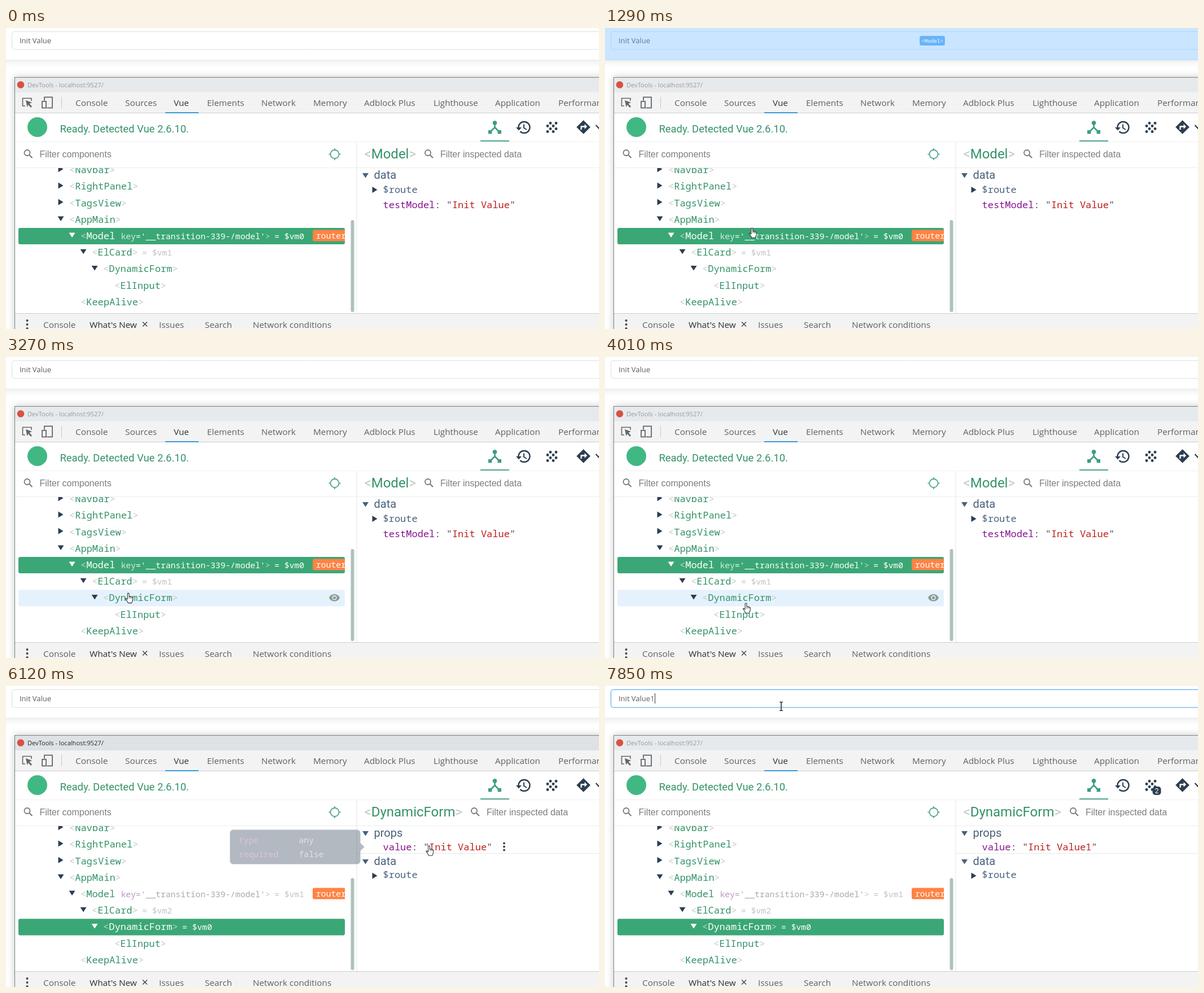
An HTML page with a canvas for the animation above (8 s loop, 1050 px wide and 533 px high).

```html
<!DOCTYPE html>
<html lang="en">
<head>
<meta charset="utf-8">
<title>Component inspector</title>
<style>
html, body { margin: 0; width: 100%; height: 100%; overflow: hidden; background: #fff; }
canvas { display: block; }
</style>
</head>
<body>
<canvas id="stage" width="1050" height="533"></canvas>
<script>
const ctx = document.getElementById('stage').getContext('2d');
const LOOP = 8000, SELECT = 4480, FOCUS = 7450, TYPED = 7850;
const GREEN = '#349268', ROW_GREEN = '#3ba776', DARK = '#2c3e50', SLATE = '#48617c', TEAL = '#54a592';
const UI = '"Open Sans", sans-serif';
const TAB_FONT = '15.3px ' + UI;
const SEARCH_FONT = '16px "Liberation Sans", sans-serif';
const mono = size => `${size}px "Noto Sans Mono", monospace`;
const roboto = size => `${size}px Roboto, sans-serif`;
const CODE = mono(17), SMALL = mono(14.7);

const ROW_H = 29.2, TREE_TOP = 237;
const rows = [
  { name: 'Navbar', x: 112, arrow: 'right' },
  { name: 'RightPanel', x: 112, arrow: 'right' },
  { name: 'TagsView', x: 112, arrow: 'right' },
  { name: 'AppMain', x: 112, arrow: 'down' },
  { name: 'Model', x: 132, arrow: 'down', key: '__transition-339-/model', vm: ['$vm0', '$vm1'] },
  { name: 'ElCard', x: 152, arrow: 'down', vm: ['$vm1', '$vm2'] },
  { name: 'DynamicForm', x: 172, arrow: 'down', vm: ['', '$vm0'] },
  { name: 'ElInput', x: 192 },
  { name: 'KeepAlive', x: 132 }
];
const tabs = [['Console', 123], ['Sources', 211], ['Vue', 297], ['Elements', 356], ['Network', 452],
  ['Memory', 544], ['Adblock Plus', 634], ['Lighthouse', 757], ['Application', 866], ['Performance', 978]];
const drawer = [['Console', 66], ["What's New", 148], ['Issues', 271], ['Search', 352], ['Network conditions', 437]];

// time, x, y of the pointer tip
const pointerPath = [
  [400, 292, 508], [540, 281, 428], [800, 281, 428], [940, 281, 357], [1220, 277, 357],
  [1290, 260.5, 354], [1570, 200, 360], [1640, 200, 360], [2060, 195, 359], [3000, 195, 359],
  [3270, 216.5, 418], [3540, 243, 447], [3810, 243, 447], [4010, 249.5, 436], [4949, 249.5, 436],
  [4950, 501.5, 361], [5300, 690, 303], [5720, 755, 284], [5780, 755, 284], [5850, 749.5, 283],
  [6120, 749.5, 283], [6900, 310, 46], [6969, 310, 46], [6970, 312, 36]
];
const highlights = [[470, 800, 'DynamicForm'], [900, 3130, 'Model'], [3470, 3810, 'ElInput'], [4080, 4950, 'DynamicForm']];

const clamp = v => Math.max(0, Math.min(1, v));
const mix = (a, b, k) => a + (b - a) * k;

function pointerAt(t) {
  if (t < pointerPath[0][0]) return null;
  const i = pointerPath.findIndex(p => p[0] > t);
  const a = pointerPath[i < 0 ? pointerPath.length - 1 : i - 1];
  const b = i < 0 ? a : pointerPath[i];
  const k = a === b ? 0 : (t - a[0]) / (b[0] - a[0]);
  const onTarget = t < 5020 || (t >= 5350 && t < 6190);
  return { x: mix(a[1], b[1], k), y: mix(a[2], b[2], k), shape: t >= 6970 ? 'beam' : onTarget ? 'hand' : 'arrow' };
}

function text(str, x, y, color, font) {
  ctx.font = font;
  ctx.fillStyle = color;
  ctx.fillText(str, x, y);
  return x + ctx.measureText(str).width;
}
function rect(x, y, w, h, color) {
  ctx.fillStyle = color;
  ctx.fillRect(x, y, w, h);
}
function roundRect(x, y, w, h, r, fill, stroke) {
  ctx.beginPath();
  ctx.roundRect(x, y, w, h, r);
  if (fill) { ctx.fillStyle = fill; ctx.fill(); }
  if (stroke) { ctx.strokeStyle = stroke; ctx.lineWidth = 1; ctx.stroke(); }
}
function dot(x, y, r, color) {
  ctx.beginPath();
  ctx.arc(x, y, r, 0, Math.PI * 2);
  ctx.fillStyle = color;
  ctx.fill();
}
function ring(x, y, r, color, width) {
  ctx.beginPath();
  ctx.arc(x, y, r, 0, Math.PI * 2);
  ctx.strokeStyle = color;
  ctx.lineWidth = width;
  ctx.stroke();
}
function trace(points, x = 0, y = 0) {
  ctx.beginPath();
  points.forEach(([px, py]) => ctx.lineTo(x + px, y + py));
}
function poly(points, x, y, color) {
  trace(points, x, y);
  ctx.closePath();
  ctx.fillStyle = color;
  ctx.fill();
}
function line(points, color, width) {
  trace(points);
  ctx.strokeStyle = color;
  ctx.lineWidth = width;
  ctx.stroke();
}
function triangle(x, y, dir, color = DARK) {
  poly(dir === 'down' ? [[-5.5, -4], [5.5, -4], [0, 4.5]] : [[-4.5, -5.5], [4.5, 0], [-4.5, 5.5]], x, y, color);
}
function searchIcon(x) {
  ring(x - 2, 221, 5, '#777', 1.8);
  line([[x + 1.7, 224.7], [x + 7, 230]], '#777', 2);
}
function moreDots(x, y, gap) {
  for (const d of [-gap, 0, gap]) dot(x, y + d, 2, '#445');
}

function drawPage(t) {
  ctx.save();
  ctx.shadowColor = 'rgba(0,0,0,.1)';
  ctx.shadowBlur = 12;
  ctx.shadowOffsetY = 2;
  rect(-20, -20, 1100, 77, '#fff');
  ctx.restore();
  rect(0, 56, 1050, 1, '#ebeef5');
  const k = clamp((t - FOCUS) / 200);
  const base = t >= 6970 ? [192, 196, 204] : [220, 223, 230];
  const border = [64, 158, 255].map((c, i) => Math.round(mix(base[i], c, k)));
  roundRect(10.5, 6.5, 1140, 31.5, 4, '#fff', `rgb(${border})`);
  const end = text('Init Value' + (t >= TYPED ? '1' : ''), 24, 26.5, '#565a5e', '13px ' + UI);
  if (t >= FOCUS + 50) rect(Math.round(end), 13, 1, 18, '#333');
}

function drawHighlight(t) {
  const hit = highlights.find(([from, to]) => t >= from && t < to);
  if (!hit) return;
  const tint = 'rgba(104,182,255,.35)';
  if (hit[2] === 'Model') rect(0, 0, 1050, 57, tint);
  else roundRect(10, 6, 1140, 32, 3, tint);
  ctx.font = '9.2px "Liberation Mono", monospace';
  const font = ctx.font, w = ctx.measureText(`<${hit[2]}>`).width + 6;
  roundRect(579.5 - w / 2, 14, w, 17, 3, 'rgba(96,175,250,.92)');
  let x = text('<', 582.5 - w / 2, 26, '#cfe7ff', font);
  x = text(hit[2], x, 26, '#fff', font);
  text('>', x, 26, '#cfe7ff', font);
}

function drawToolbar(active) {
  ctx.save();
  ctx.shadowColor = 'rgba(0,0,0,.22)';
  ctx.shadowBlur = 12;
  rect(15, 87, 1100, 500, '#7d8084');
  ctx.restore();
  rect(16, 88, 1034, 445, '#fff');
  rect(16, 88, 1034, 27, active ? '#dee1e6' : '#e7eaed');
  dot(26, 100.5, 6.3, '#d9513f');
  text('DevTools - localhost:9527/', 38, 105, active ? '#25282c' : '#96999d', '11.1px ' + UI);

  rect(16, 114, 1034, 36, '#f3f3f3');
  rect(16, 150, 1034, 1, '#cdcdcd');
  const ink = '#62666b';
  line([[34, 138], [29.5, 138], [29.5, 124.5], [45, 124.5], [45, 129]], ink, 1.6);
  poly([[0, 0], [11, 4], [6.5, 6], [11, 11], [9, 13], [4.5, 8], [2.5, 12]], 35, 128, ink);
  ctx.strokeStyle = ink;
  ctx.lineWidth = 1.8;
  ctx.strokeRect(68, 122.5, 14, 19);
  rect(62.5, 128.5, 10, 14.5, '#f3f3f3');
  ctx.strokeRect(64, 130, 7, 11.5);
  rect(98, 122, 1, 20, '#c8c8c8');
  tabs.forEach(([label, x]) => text(label, x, 137.5, label === 'Vue' ? '#333' : '#5c6065', TAB_FONT));
  rect(282, 149, 59, 2, '#3a9ad9');
}

function drawHeader(t) {
  dot(55.5, 175.5, 17.5, '#41b883');
  text('Ready. Detected Vue 2.6.10.', 95.5, 184.5, GREEN, roboto(18.4));

  // component hub
  dot(865.5, 168, 3.8, '#3d9c84');
  line([[865.5, 168], [865.5, 176], [857, 184.5]], '#3d9c84', 2.6);
  line([[865.5, 176], [874, 184.5]], '#3d9c84', 2.6);
  rect(854, 181, 6.4, 6.4, '#3d9c84');
  rect(870.6, 181, 6.4, 6.4, '#3d9c84');
  rect(840, 199, 51, 2, TEAL);

  // history
  ctx.beginPath();
  ctx.arc(917.5, 176, 10, -Math.PI, Math.PI * 0.75);
  ctx.strokeStyle = DARK;
  ctx.lineWidth = 2.4;
  ctx.stroke();
  poly([[-5, 0], [5, 0], [0, 5.5]], 908, 176, DARK);
  line([[917, 170.5], [917, 177], [922, 180]], DARK, 2);

  // event dots
  for (let i = 0; i < 4; i++)
    for (let j = 0; j < 4; j++)
      if ((i + j) % 2) dot(959 + i * 5, 168.5 + j * 5, 2.4, DARK);
  if (t >= FOCUS + 70) {
    roundRect(969.5, 178, 15, 15, 5, DARK);
    text(t >= TYPED ? '2' : '1', 973.6, 190, '#fff', roboto(12.5));
  }

  // route sign
  poly([[0, -12.3], [12.3, 0], [0, 12.3], [-12.3, 0]], 1022.5, 175.5, DARK);
  line([[1018.5, 180], [1018.5, 174.5], [1025, 174.5]], '#fff', 2.3);
  poly([[0, -4.5], [4.5, 0], [0, 4.5]], 1024.5, 174.5, '#fff');
  line([[1044.5, 172], [1049.5, 177.5], [1054, 172]], DARK, 2.2);
}

function drawTree(t, pointer) {
  const after = t >= SELECT, selected = after ? 6 : 4;
  let hover = -1;
  if (t >= 4950 && t < 5020) hover = 5;
  else if (pointer && pointer.shape === 'hand' && pointer.x < 600) hover = Math.floor((pointer.y - TREE_TOP) / ROW_H);

  searchIcon(39.5);
  text('Filter components', 59.5, 228.5, '#7d7d7d', SEARCH_FONT);
  ring(582, 223.5, 7.5, TEAL, 1.8);
  for (const [dx, dy] of [[1, 0], [-1, 0], [0, 1], [0, -1]])
    line([[582 + dx * 7, 223.5 + dy * 7], [582 + dx * 10.5, 223.5 + dy * 10.5]], TEAL, 1.8);

  ctx.save();
  ctx.beginPath();
  ctx.rect(16, 248, 584, 258);
  ctx.clip();
  rows.forEach((row, i) => {
    const mid = TREE_TOP + (i + 0.5) * ROW_H, base = mid + 5.5, on = i === selected;
    if (on) roundRect(22, mid - 14.5, 578, 29.2, 3, ROW_GREEN);
    else if (i === hover) {
      roundRect(22, mid - 14.5, 578, 29.2, 3, '#e5f2fd');
      drawEye(581.5, mid - 0.5);
    }
    if (row.arrow) triangle(row.x - 15, mid - 1.8, row.arrow, on ? '#fff' : DARK);
    const faint = on ? '#b5dcc9' : '#c6c6c6';
    let x = text('<', row.x, base, faint, CODE);
    x = text(row.name, x, base, on ? '#fff' : GREEN, CODE);
    if (row.key) {
      x = text('key', x + 10.2, base, on ? '#d3ebdf' : '#bd96c5', SMALL);
      x = text(`='${row.key}'`, x, base, on ? '#fff' : '#a9a9a9', SMALL);
    }
    x = text('>', x, base, faint, row.key ? SMALL : CODE);
    const vm = row.vm && row.vm[+after];
    if (vm) text('= ' + vm, x + 7.5, base, on ? '#fff' : '#c2c2c2', SMALL);
    if (row.key) {
      roundRect(543, mid - 11, 160, 20, 3, '#ff8344');
      text('router-view: /model', 549, mid + 4.5, '#fff', SMALL);
    }
  });
  ctx.restore();
  roundRect(610.5, 340, 6, 163, 3, '#aec3be');
}

function drawEye(x, y) {
  ctx.beginPath();
  ctx.moveTo(x - 9.5, y);
  ctx.bezierCurveTo(x - 6, y - 8.5, x + 6, y - 8.5, x + 9.5, y);
  ctx.bezierCurveTo(x + 6, y + 8.5, x - 6, y + 8.5, x - 9.5, y);
  ctx.fillStyle = '#8c9a94';
  ctx.fill();
  ring(x, y, 3.4, '#e5f2fd', 1.6);
}

function drawField(name, value, y) {
  let x = text(name, 667.5, y, '#881391', CODE);
  x = text(': ', x, y, '#444', CODE);
  x = text('"', x, y, '#5a4448', CODE);
  x = text(value, x, y, '#bd1f1a', CODE);
  text('"', x, y, '#5a4448', CODE);
}

function drawInspector(t) {
  const after = t >= SELECT;
  const value = 'Init Value' + (t >= TYPED ? '1' : '');
  let x = text('<', 634.5, 230.5, '#c2c8c6', roboto(24));
  x = text(after ? 'DynamicForm' : 'Model', x, 230.5, GREEN, roboto(24));
  x = text('>', x, 230.5, '#c2c8c6', roboto(24));
  searchIcon(after ? 831 : 749);
  text('Filter inspected data', after ? 851 : 769, 228.5, '#7d7d7d', SEARCH_FONT);

  triangle(636.5, 261, 'down', SLATE);
  text(after ? 'props' : 'data', 651.5, 267, SLATE, roboto(20));
  if (after) {
    drawField('value', value, 290.5);
    if (t >= 5400 && t < 6190) moreDots(882, 284.5, 6);
    rect(622, 296, 428, 1, '#e8e8e8');
    triangle(636.5, 311, 'down', SLATE);
    text('data', 651.5, 317, SLATE, roboto(20));
  } else drawField('testModel', value, 318.5);
  triangle(653, after ? 336 : 286.5, 'right');
  text('$route', 667.5, after ? 340 : 292, SLATE, CODE);
}

function drawTooltip(t) {
  const alpha = t < 6120 ? clamp((t - 5500) / 140) : t < 6190 ? 0.36 : t < 6260 ? 0.1 : 0;
  if (!alpha) return;
  ctx.save();
  ctx.globalAlpha = alpha;
  roundRect(396.5, 254.5, 231, 61, 6, DARK);
  poly([[0, -7], [7, 0], [0, 7]], 627.5, 285, DARK);
  ctx.globalAlpha = Math.sqrt(alpha);
  [['type', 'any', 278], ['required', 'false', 303]].forEach(([key, val, y]) => {
    text(key, 412, y, alpha < 1 ? '#f5cbf8' : '#e36eec', SMALL);
    text(val, 518.5, y, '#fff', '500 ' + SMALL);
  });
  ctx.restore();
}

function drawDrawer() {
  rect(16, 506, 1034, 27, '#f3f3f3');
  rect(16, 505, 1034, 1, '#cdcdcd');
  moreDots(37.5, 525, 7);
  drawer.forEach(([label, x], i) => text(label, x, 530.5, i === 1 ? '#2b2d30' : '#5c6065', TAB_FONT));
  line([[242, 520.5], [250, 528.5]], '#444', 1.5);
  line([[250, 520.5], [242, 528.5]], '#444', 1.5);
}

function drawPointer({ x, y, shape }) {
  if (shape === 'beam') {
    line([[x - 3, y - 7.5], [x + 3, y - 7.5]], '#222', 1.3);
    line([[x, y - 7.5], [x, y + 7.5]], '#222', 1.5);
    line([[x - 3, y + 7.5], [x + 3, y + 7.5]], '#222', 1.3);
    return;
  }
  const outline = shape === 'arrow'
    ? [[0, 0], [0, 16], [4, 12.5], [6.5, 18.5], [9, 17.5], [6.5, 11.5], [11.5, 11.5]]
    : [[-1.3, 0.5], [0.3, 0], [1.5, 1], [1.5, 6], [4, 6], [6.5, 7], [8, 8.5], [7.5, 13], [6, 17.5],
      [-0.5, 17.5], [-2.5, 13.5], [-5, 10.5], [-4.5, 9], [-1.5, 11]];
  poly(outline, x, y, '#fff');
  trace(outline, x, y);
  ctx.closePath();
  ctx.strokeStyle = '#30343a';
  ctx.lineWidth = 1.1;
  ctx.lineJoin = 'round';
  ctx.stroke();
  ctx.lineJoin = 'miter';
  if (shape === 'hand') for (const dx of [1.5, 3.8, 5.8]) line([[x + dx, y + 6], [x + dx, y + 9.5]], '#555', 0.9);
}

function draw(t) {
  const pointer = pointerAt(t);
  rect(0, 0, 1050, 533, '#fff');
  drawPage(t);
  drawHighlight(t);
  drawToolbar(t >= SELECT && t < FOCUS);
  drawHeader(t);
  rect(16, 201, 1034, 1, '#f0f0f0');
  rect(16, 247, 1034, 1, '#ececec');
  rect(620.5, 202, 1, 304, '#e6e6e6');
  drawTree(t, pointer);
  drawInspector(t);
  drawTooltip(t);
  drawDrawer();
  if (pointer) drawPointer(pointer);
}

function tick() {
  draw(performance.now() % LOOP);
  requestAnimationFrame(tick);
}
tick();
</script>
</body>
</html>
```
